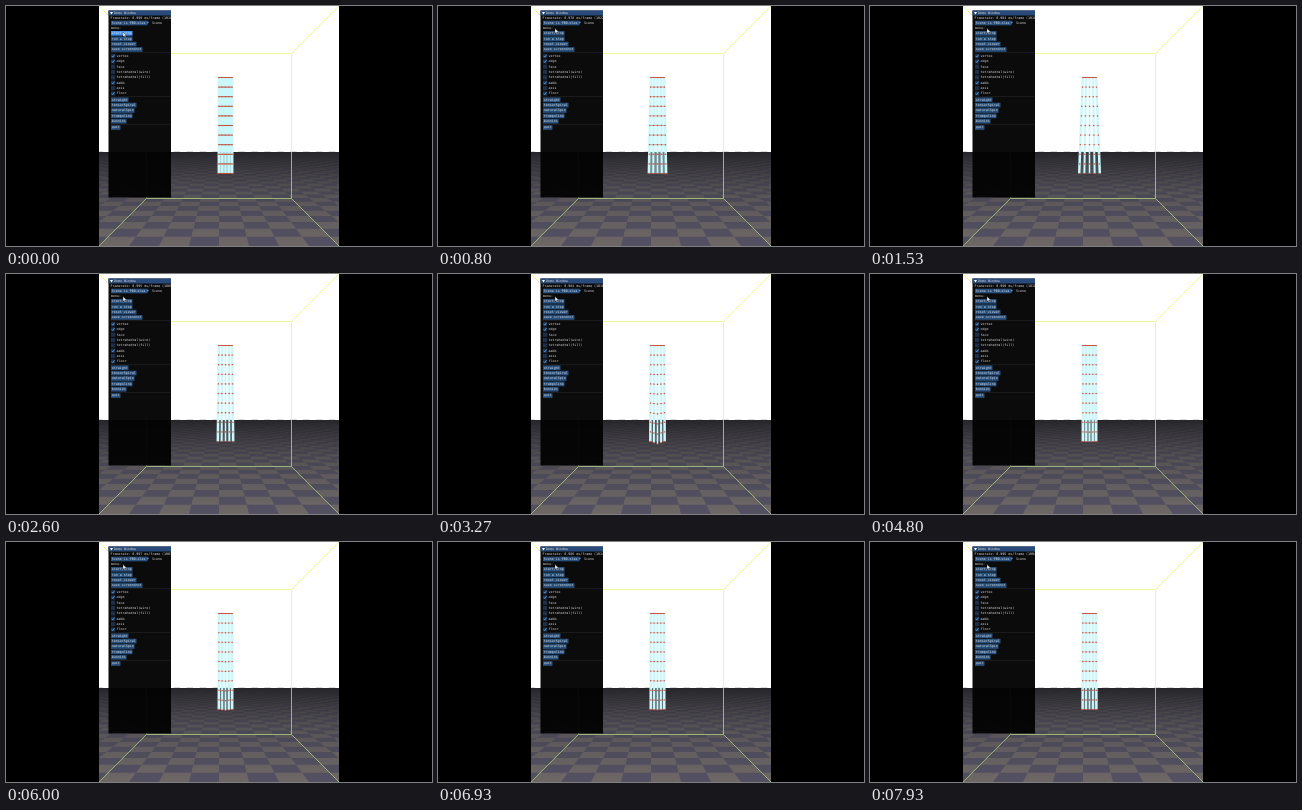
An HTML page with a canvas for the animation above (8 s loop, 426 by 240 pixels).

```html
<!DOCTYPE html>
<html lang="en">
<head>
<meta charset="utf-8">
<title>Soft body simulation</title>
<style>
  html, body { margin: 0; width: 100%; height: 100%; overflow: hidden; background: #000; }
  canvas { display: block; }
</style>
</head>
<body>
<canvas id="stage" width="426" height="240"></canvas>
<script>
const ctx = document.getElementById('stage').getContext('2d');
const LOOP = 8000;
const CENTER = { x: 213, y: 120 }, FOCAL = 360;

// time, spread at the bottom, sag of the middle strand, fill opacity, row opacity
const POSES = [
  [0, 0, 0, .85, .95],
  [1530, 3.6, 0, .12, .12],
  [2600, 1, 0, .15, .2],
  [3930, 0, 5, .3, .12],
  [4800, 0, .3, .5, .2],
  [6000, 0, 1, .35, .2],
  [7930, .2, 0, .35, .3],
  [8000, .2, 0, .35, .3]
];

function poseAt(time) {
  const i = POSES.findIndex(p => p[0] > time);
  const from = POSES[i - 1], to = POSES[i];
  const k = (time - from[0]) / (to[0] - from[0]);
  const ease = (1 - Math.cos(Math.PI * k)) / 2;
  return from.map((v, n) => v + (to[n] - v) * ease);
}

function rect(x, y, w, h, color) {
  ctx.fillStyle = color;
  ctx.fillRect(x, y, w, h);
}

function trace(points) {
  ctx.beginPath();
  points.forEach(([x, y]) => ctx.lineTo(x, y));
}

function stroke(points, color, width = 1) {
  trace(points);
  ctx.strokeStyle = color;
  ctx.lineWidth = width;
  ctx.stroke();
}

function fill(points, color) {
  trace(points);
  ctx.fillStyle = color;
  ctx.fill();
}

function text(str, x, y, color = '#dcdcdc') {
  ctx.fillStyle = color;
  ctx.fillText(str, x, y);
}

const project = (x, z) => [CENTER.x + FOCAL * x / z, CENTER.y + FOCAL / z];

function drawFloor() {
  const tile = .25;
  rect(93, 146, 240, 94, '#535163');
  for (let row = 0; row < 44; row++) {
    const near = 3 + row * tile, far = near + tile;
    const half = Math.ceil(near / 3 / tile) + 1;
    for (let col = -half; col < half; col++) {
      if ((row + col) & 1) continue;
      const x = col * tile;
      fill([project(x, near), project(x + tile, near), project(x + tile, far), project(x, far)], '#706a68');
    }
  }
  const fog = ctx.createLinearGradient(0, 146, 0, 240);
  fog.addColorStop(0, 'rgba(30,30,34,.88)');
  fog.addColorStop(.4, 'rgba(58,57,64,.5)');
  fog.addColorStop(1, 'rgba(80,78,84,.1)');
  rect(93, 146, 240, 94, fog);
}

function drawBox() {
  const [l, t, r, b] = [140.5, 47.5, 285.5, 192.5];
  const upper = '#f1f68e', lower = '#9db57c';
  stroke([[l, 146], [l, t], [r, t], [r, 146]], upper);
  stroke([[93, 0], [l, t]], upper);
  stroke([[333, 0], [r, t]], upper);
  stroke([[l, 146], [l, b], [r, b], [r, 146]], lower);
  stroke([[93, 240], [l, b]], lower);
  stroke([[333, 240], [r, b]], lower);
}

function drawBody(time) {
  const [, spread, sag, fillAlpha, rowAlpha] = poseAt(time);
  const rows = 10, strands = [-1, -.5, 0, .5, 1];
  const point = (u, row) => {
    const p = row / rows;
    return [219.5 + u * (6.7 + spread * p), 71.5 + 96 * p + sag * (1 - Math.abs(u)) * p * p];
  };
  const column = u => Array.from({ length: rows + 1 }, (_, row) => point(u, row));

  fill([...column(-1), ...column(1).reverse()], `rgba(190,246,250,${fillAlpha})`);
  strands.forEach(u => stroke(column(u), '#cdf7fa', 1.5 + Math.abs(u)));
  for (let row = 0; row <= rows; row++) {
    const alpha = row ? rowAlpha : .9;
    stroke(strands.map(u => point(u, row)), `rgba(190,75,50,${alpha})`);
    strands.forEach(u => {
      const [x, y] = point(u, row);
      rect(x - .6, y - .6, 1.2, 1.2, '#c8503f');
    });
  }
}

function button(label, y, hovered) {
  rect(105, y - 2.3, label.length * 2 + 1.5, 4.6, hovered ? '#4296fa' : '#28507f');
  text(label, 105.8, y);
}

function checkbox(label, y, checked) {
  rect(105, y - 2.1, 4.2, 4.2, '#1d2f49');
  if (checked) stroke([[105.8, y], [106.8, y + 1.2], [108.5, y - 1.3]], '#63a9ff', .8);
  text(label, 110.5, y);
}

function drawPanel(time) {
  ctx.save();
  ctx.beginPath();
  ctx.rect(102.5, 4.5, 62.5, 187);
  ctx.clip();
  rect(102, 4, 64, 188, 'rgba(4,4,4,.97)');
  rect(102, 4, 64, 5.5, '#294a7a');
  ctx.font = '3.3px "DejaVu Sans Mono", monospace';
  ctx.textBaseline = 'middle';
  fill([[104, 6], [107, 6], [105.5, 8.5]], '#fff');
  text('Demo Window', 108, 7);
  const ms = (.99 + .012 * Math.sin(Math.floor(time / 267) * 2.4)).toFixed(3);
  text(`Framerate: ${ms} ms/frame (${(1000 / ms).toFixed(1)} FPS)`, 104.5, 12.5);
  rect(105, 14.7, 36.5, 4.6, '#28507f');
  text('Scene is PBD-elas', 105.8, 17);
  fill([[140.5, 15.8], [143, 15.8], [141.7, 18]], '#4296fa');
  text('Scene', 146, 17);
  text('menu:', 105, 22.3);

  button('start/stop', 27.3, time < 500);
  button('run a step', 32.8);
  button('reset viewer', 38.1);
  button('save screenshot', 43.5);
  rect(104, 46.6, 60, .4, '#303038');
  ['vertex', 'edge', 'face', 'tetrahedral(wire)', 'tetrahedral(fill)', 'aabb', 'axis', 'floor']
    .forEach((label, i) => checkbox(label, 50 + i * 5.35, [0, 1, 5, 7].includes(i)));
  rect(104, 90.6, 60, .4, '#303038');
  ['straight', 'tensorSpiral', 'naturalSpin', 'trampoline', 'bunnies']
    .forEach((label, i) => button(label, 93.7 + i * 5.4));
  rect(104, 118.6, 60, .4, '#303038');
  button('quit', 121.6);
  ctx.restore();
}

function drawCursor(time) {
  const y = 26 - 3.5 * Math.min(1, time / 700);
  const arrow = [[0, 0], [0, 4.8], [1.2, 3.8], [2, 5.4], [2.8, 5], [2, 3.5], [3.5, 3.4], [0, 0]]
    .map(([dx, dy]) => [117 + dx, y + dy]);
  fill(arrow, '#fff');
  stroke(arrow, '#222', .4);
}

function draw(now) {
  const time = now % LOOP;
  rect(0, 0, 426, 240, '#000');
  ctx.save();
  ctx.beginPath();
  ctx.rect(93, 0, 240, 240);
  ctx.clip();
  rect(93, 0, 240, 146, '#fff');
  drawFloor();
  drawBox();
  drawBody(time);
  drawPanel(time);
  drawCursor(time);
  ctx.restore();
}

let start;
function tick(now) {
  start ??= now;
  draw(Math.max(0, now - start));
  requestAnimationFrame(tick);
}
requestAnimationFrame(tick);
</script>
</body>
</html>
```
